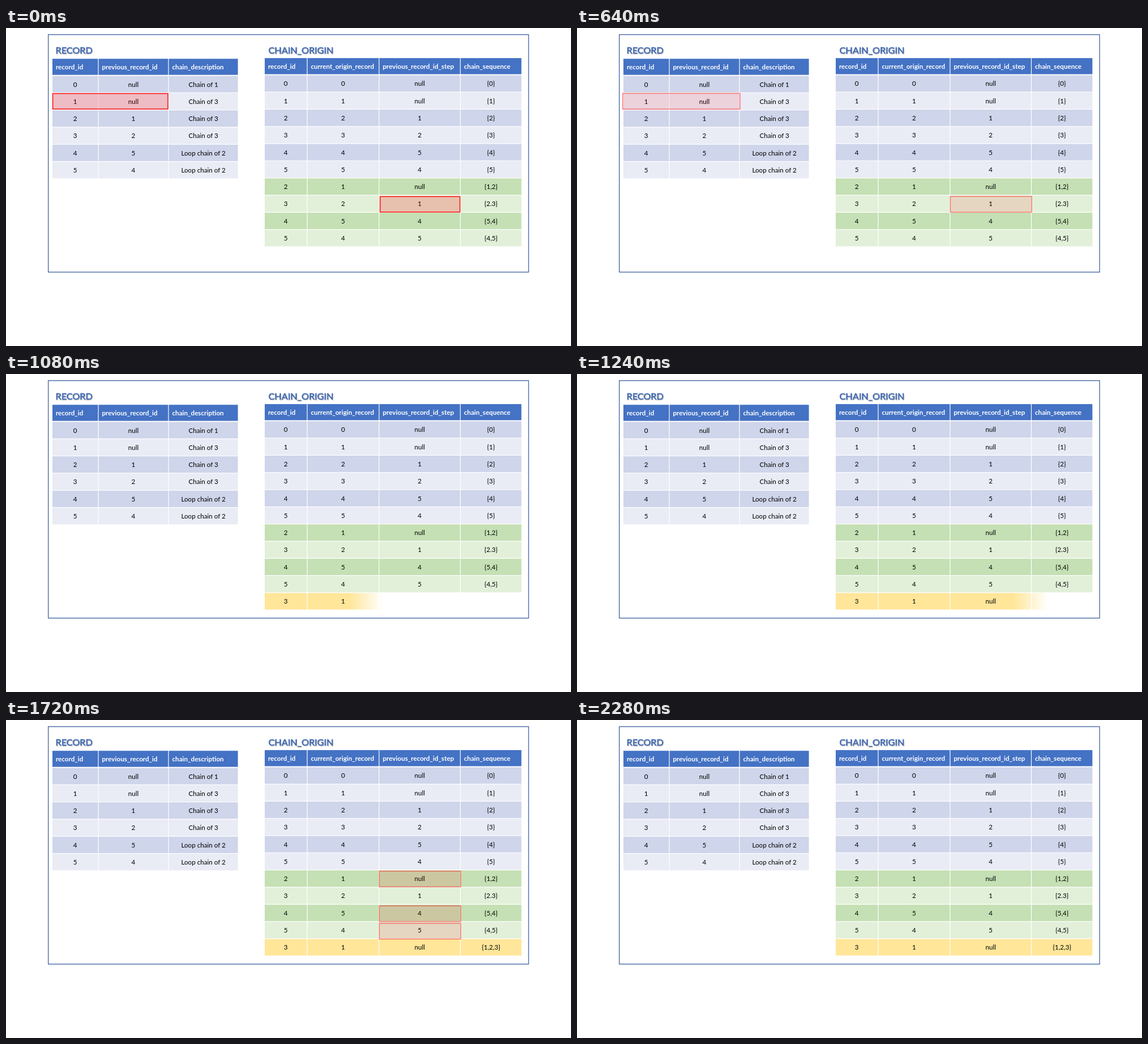
Recreate the animation shown at these times as an HTML page. Size 998 by 561 pixels, loop 6060 ms.

```html
<!DOCTYPE html>
<html lang="en">
<head>
<meta charset="utf-8">
<title>Record chains</title>
<style>
  html, body { margin: 0; width: 100%; height: 100%; overflow: hidden; background: #fff; }
  svg { display: block; width: 998px; height: 561px; }
  text { font: 11.65px Lato, sans-serif; }
  .cell { text-anchor: middle; }
  .head { font-weight: 700; fill: #fff; }
  .title {
    font-size: 16.2px; fill: #4472c4; stroke: #4472c4; stroke-width: .45px;
    text-shadow: .8px 1px 1.2px rgba(0, 0, 0, .35);
  }
  .mark { fill: rgba(255, 0, 0, .2); stroke: #f00; stroke-width: 1.4px; }
</style>
</head>
<body>
<svg id="stage" viewBox="0 0 998 561">
  <defs>
    <linearGradient id="edge" gradientUnits="userSpaceOnUse" y1="0" y2="0">
      <stop offset="0" stop-color="#fff"/>
      <stop offset="1" stop-color="#000"/>
    </linearGradient>
    <mask id="wipe" maskUnits="userSpaceOnUse" x="0" y="0" width="998" height="561">
      <rect width="998" height="561" fill="url(#edge)"/>
    </mask>
  </defs>
  <rect x="74.7" y="11.7" width="848.4" height="418.9" fill="none" stroke="#2f5597" stroke-width="1.2"/>
</svg>
<script>
const LOOP = 6060, STEP = 40;
const ROW = 30.3, GAP = 1.2;
const PULSE = 291, PULSES = 3, GROWTH = 0.05;
const WIPE_START = 877, WIPE_SPEED = 1.035, WIPE_SOFT = 62;
const BLUE = ['#cfd5ea', '#e9ebf5'], GREEN = ['#c5e0b4', '#e2f0d9'], YELLOW = ['#ffe699'];

const stage = document.getElementById('stage');
const edge = document.getElementById('edge');

function add(parent, tag, attrs, content = '') {
  const node = document.createElementNS('http://www.w3.org/2000/svg', tag);
  for (const name in attrs) node.setAttribute(name, attrs[name]);
  node.textContent = content;
  parent.append(node);
  return node;
}

function drawRow(parent, edges, top, cells, fill, isHead = false) {
  cells.forEach((label, i) => {
    const left = edges[i], width = edges[i + 1] - left;
    add(parent, 'rect', {
      x: left + GAP / 2, y: top + GAP / 2,
      width: width - GAP, height: ROW - GAP - (isHead ? 0.7 : 0), fill
    });
    const x = isHead ? left + 6.5 : left + width / 2;
    add(parent, 'text', { x, y: top + 19.5, class: isHead ? 'head' : 'cell' }, label);
  });
}

function drawTable(title, titleX, edges, top, head, groups) {
  add(stage, 'text', { x: titleX, y: 45, class: 'title' }, title);
  drawRow(stage, edges, top, head, '#4472c4', true);
  let y = top + ROW;
  for (const { rows, colors, parent = stage } of groups) {
    rows.forEach((row, i) => {
      drawRow(parent, edges, y, row.split(' | '), colors[i % colors.length]);
      y += ROW;
    });
  }
}

drawTable('RECORD', 87.5, [81.4, 163, 287, 410.2], 53.7,
  ['record_id', 'previous_record_id', 'chain_description'],
  [{ colors: BLUE, rows: [
    '0 | null | Chain of 1', '1 | null | Chain of 3', '2 | 1 | Chain of 3',
    '3 | 2 | Chain of 3', '4 | 5 | Loop chain of 2', '5 | 4 | Loop chain of 2'
  ] }]);

const newRow = add(stage, 'g', { mask: 'url(#wipe)' });
drawTable('CHAIN_ORIGIN', 463.5, [456.4, 532, 659, 802.5, 911], 52.5,
  ['record_id', 'current_origin_record', 'previous_record_id_step', 'chain_sequence'],
  [
    { colors: BLUE, rows: [
      '0 | 0 | null | {0}', '1 | 1 | null | {1}', '2 | 2 | 1 | {2}',
      '3 | 3 | 2 | {3}', '4 | 4 | 5 | {4}', '5 | 5 | 4 | {5}'
    ] },
    { colors: GREEN, rows: [
      '2 | 1 | null | {1,2}', '3 | 2 | 1 | {2.3}', '4 | 5 | 4 | {5,4}', '5 | 4 | 5 | {4,5}'
    ] },
    { colors: YELLOW, rows: ['3 | 1 | null | {1,2,3}'], parent: newRow }
  ]);

function mark(start, x, y, width, height = 27.3) {
  const node = add(stage, 'rect', { x, y, width, height, class: 'mark' });
  return { node, start, cx: x + width / 2, cy: y + height / 2 };
}

const marks = [
  mark(4, 82.6, 115.6, 203.4),
  mark(4, 660.8, 297.4, 141),
  ...[266.8, 328, 358.9].map(y => mark(1375, 660.8, y, 141))
];

// Each pulse swells and shrinks while its opacity dips to one half.
function pulseMark({ node, start, cx, cy }, time) {
  const count = (time - start) / PULSE;
  const visible = count < PULSES && (start < STEP || count >= 0);
  node.style.display = visible ? '' : 'none';
  const phase = Math.max(0, count) % 1;
  const nearest = Math.min(phase, 1 - phase);
  const scale = 1 + GROWTH * 2 * nearest;
  node.setAttribute('opacity', 1 - 0.5 * Math.min(1, nearest / 0.2));
  node.setAttribute('transform', `translate(${cx} ${cy}) scale(${scale}) translate(${-cx} ${-cy})`);
}

function render(time) {
  for (const item of marks) pulseMark(item, time);
  const front = 457 + (time - WIPE_START) * WIPE_SPEED;
  newRow.style.display = time >= WIPE_START ? '' : 'none';
  edge.setAttribute('x1', front - WIPE_SOFT);
  edge.setAttribute('x2', front);
}

const origin = performance.now();
function tick() {
  const time = (performance.now() - origin) % LOOP;
  render(Math.floor(time / STEP) * STEP);
  requestAnimationFrame(tick);
}
tick();
</script>
</body>
</html>
```
